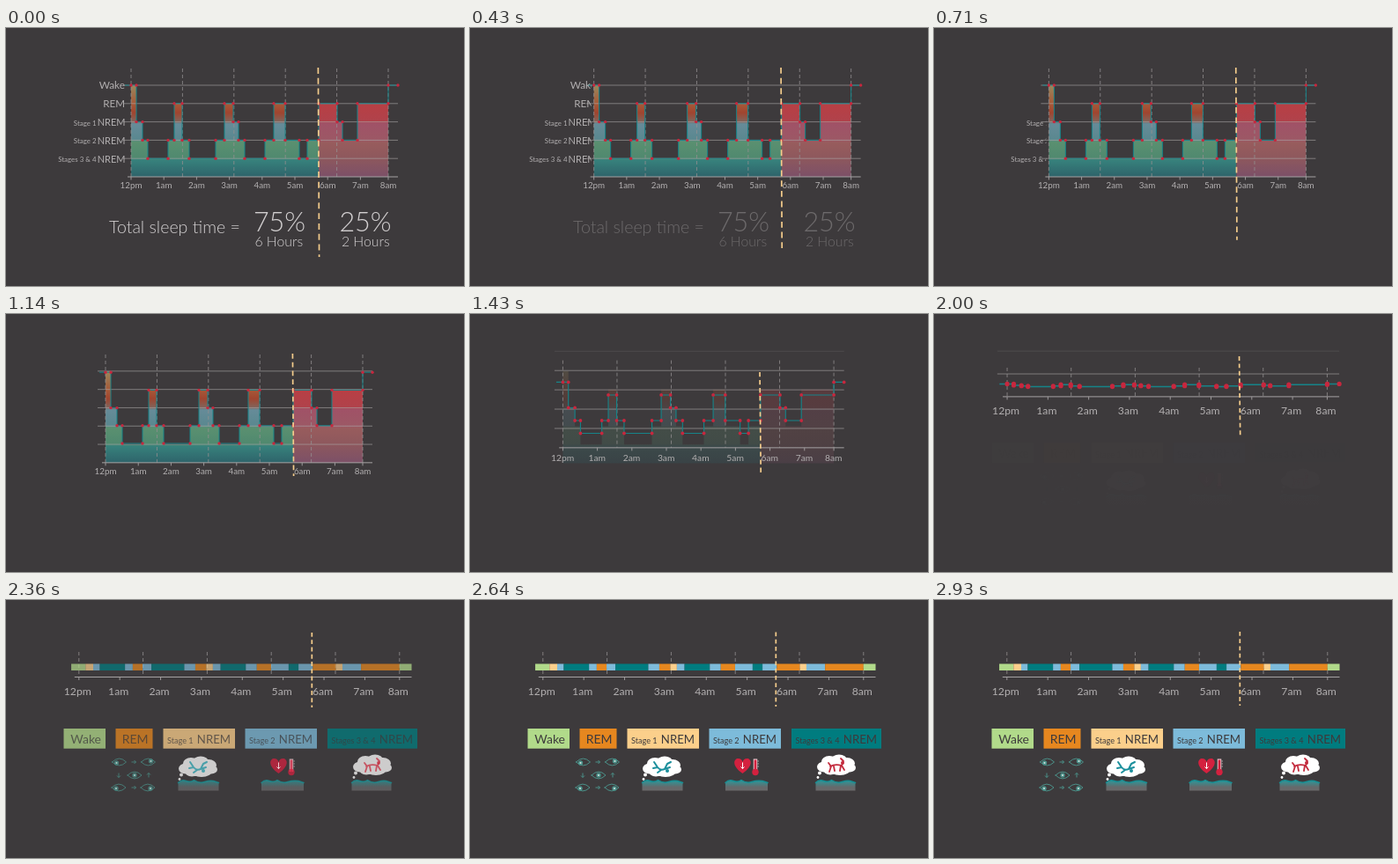
These frames come from a looping animation (520x293 px, 3 s). An HTML page with a canvas:

```html
<!DOCTYPE html>
<html lang="en">
<head>
<meta charset="utf-8">
<title>Sleep stages</title>
<style>
  html, body { margin: 0; width: 100%; height: 100%; overflow: hidden; background: #3d3a3c; }
  canvas { display: block; width: 520px; height: 293px; }
</style>
</head>
<body>
<canvas id="stage"></canvas>
<script>
const LOOP = 3000, W = 520, H = 293;
const canvas = document.getElementById('stage');
const ctx = canvas.getContext('2d');
const ratio = window.devicePixelRatio || 1;
canvas.width = W * ratio;
canvas.height = H * ratio;

const BG = '#3d3a3c', TEAL = '#168489', RED = '#c7273e', PALE = '#b2afb0', EYE = '#4b9189';
const STAGE_COLORS = ['#b1da8a', '#e6871f', '#fbcf8b', '#7dbbda', '#007c7f'];
const HOURS = ['12pm', '1am', '2am', '3am', '4am', '5am', '6am', '7am', '8am'];
const LEFT = 142, SPAN = 292, BASE = 169, ROW = 20.8, NOW = 355;

// [start x, depth]: 0 wake, 1 REM, 2 stage 1, 3 stage 2, 4 stages 3 & 4
const STEPS = [
  [135, 0], [148, 2], [155, 3], [161, 4], [184, 3], [191, 1], [200, 3], [208, 4],
  [238, 3], [248, 1], [258, 2], [264, 3], [271, 4], [294, 3], [304, 1], [317, 3],
  [333, 4], [342, 3], [355, 1], [376, 2], [382, 3], [399, 1], [434, 0]
];
const END = 445;
const stepEnd = i => i + 1 < STEPS.length ? STEPS[i + 1][0] : END;

const clamp = v => Math.max(0, Math.min(1, v));
const ramp = (t, a, b) => clamp((t - a) / (b - a));
const ease = (t, a, b) => { const p = ramp(t, a, b); return p * p * (3 - 2 * p); };
const mix = (a, b, p) => a + (b - a) * p;

function track(t, keys) {
  const i = keys.findIndex(k => k[0] > t);
  if (i < 0) return keys[keys.length - 1][1];
  const [t0, v0] = keys[i - 1], [t1, v1] = keys[i];
  return mix(v0, v1, (t - t0) / (t1 - t0));
}

function text(str, x, y, size, color, align = 'left', weight = 400) {
  ctx.font = `${weight} ${size}px Lato, "Open Sans", sans-serif`;
  ctx.textAlign = align;
  ctx.fillStyle = color;
  ctx.fillText(str, x, y);
}

function line(points, color, width = 1, dash = []) {
  ctx.beginPath();
  points.forEach(([x, y]) => ctx.lineTo(x, y));
  ctx.strokeStyle = color;
  ctx.lineWidth = width;
  ctx.setLineDash(dash);
  ctx.stroke();
  ctx.setLineDash([]);
}

function disc(x, y, r, color) {
  ctx.beginPath();
  ctx.arc(x, y, r, 0, 7);
  ctx.fillStyle = color;
  ctx.fill();
}

function shape(d, x, y, fill, stroke, width = 1) {
  ctx.save();
  ctx.translate(x, y);
  const path = new Path2D(d);
  if (fill) { ctx.fillStyle = fill; ctx.fill(path); }
  if (stroke) {
    ctx.strokeStyle = stroke;
    ctx.lineWidth = width;
    ctx.lineCap = ctx.lineJoin = 'round';
    ctx.stroke(path);
  }
  ctx.restore();
}

function faded(alpha, draw) {
  if (alpha <= 0) return;
  ctx.save();
  ctx.globalAlpha = alpha;
  draw();
  ctx.restore();
}

function gradient(y0, y1, stops) {
  const g = ctx.createLinearGradient(0, y0, 0, y1);
  stops.forEach(([at, color]) => g.addColorStop(at, color));
  return g;
}

function layout(t) {
  const zoom = ease(t, 1164, 2050);
  const slide = ease(t, 310, 1260);
  const scale = mix(1, 364 / SPAN, zoom);
  const left = LEFT - 30.3 * slide - 28.9 * zoom;
  return {
    zoom, scale, left,
    x: v => left + (v - LEFT) * scale,
    axis: mix(BASE, 87.5, ease(t, 1115, 2185)),
    levelY: d => mix(106.6, 76.3, ease(t, 1400, 2200)) + (d - 2) * mix(ROW, 0, ease(t, 1030, 2130)),
    dashTop: 46 + 15 * ease(t, 1200, 1700) - 2 * ease(t, 2000, 2360)
  };
}

function fillSteps(g, isIncluded, color) {
  const base = BASE + 2.5 * g.zoom;
  ctx.beginPath();
  STEPS.slice(0, -1).forEach(([x, depth], i) => {
    if (!isIncluded(x)) return;
    const from = g.x(Math.max(x, LEFT)), to = g.x(stepEnd(i)), top = 65 + depth * ROW;
    ctx.rect(from, top, to - from, base - top);
  });
  ctx.fillStyle = color;
  ctx.fill();
}

function drawFill(g) {
  const warm = gradient(65, BASE, [[0, '#99875c'], [.2, '#a65a39'], [.3, '#a0452f'], [.4, '#80655d'],
    [.42, '#668b98'], [.59, '#5a8890'], [.62, '#5a9070'], [.79, '#50896f'], [.82, '#37817c'], [1, '#2e636a']]);
  const pink = gradient(86, BASE, [[0, '#b83f44'], [.24, '#b0424b'], [.27, '#a05267'], [.5, '#9c5865'],
    [.53, '#985c5d'], [.74, '#8e585d'], [1, '#7c5068']]);
  fillSteps(g, x => x < NOW, warm);
  fillSteps(g, x => x >= NOW, pink);
}

function drawGrid(g, t) {
  const from = g.x(133), to = g.x(END);
  for (let k = 1; k <= 5; k++) {
    const gone = 1430 + (5 - k) * 190, y = g.axis - k * ROW * g.scale;
    faded(.68 * (1 - ease(t, gone - 120, gone + 60)), () => line([[from, y], [to, y]], '#aaa7a7', .9));
  }
  for (let i = 0; i < 6; i++) {
    const x = g.x(LEFT + i * SPAN / 5);
    line([[x, g.dashTop], [x, g.axis]], '#939091', .8, [4, 3]);
  }
  line([[g.x(138), g.axis], [to, g.axis]], '#a5a2a3', 1);
  HOURS.forEach((label, i) => {
    const x = g.x(LEFT + Math.min(i * 37.2, SPAN));
    line([[x, g.axis], [x, g.axis + 3.5]], '#a5a2a3', .9);
    text(label, x - 1.5 * g.zoom, g.axis + mix(13, 20.5, g.zoom), 9.8 * g.scale, PALE, 'center');
  });
}

function drawHypnogram(g) {
  const points = [];
  STEPS.forEach(([x, depth], i) => {
    const y = g.levelY(depth);
    points.push([g.x(x), y], [g.x(stepEnd(i)), y]);
  });
  line(points, TEAL, 1 + .5 * g.zoom);
  points[0][0] = g.left;
  points.forEach(([x, y]) => disc(x, y, mix(1.7, 2.6, g.zoom), RED));
}

function drawBar(g) {
  STEPS.forEach(([x, depth], i) => {
    ctx.fillStyle = STAGE_COLORS[depth];
    ctx.fillRect(g.x(x), 72.5, g.x(stepEnd(i)) - g.x(x), 7.5);
  });
}

function drawRowLabels(g, t) {
  if (t > 1100) return;
  const shift = 28 * ramp(t, 320, 710) + 60 * ramp(t, 710, 1100);
  ctx.save();
  ctx.beginPath();
  ctx.rect(0, 0, mix(136, g.left - 3, ramp(t, 300, 400)), H);
  ctx.clip();
  ctx.translate(shift, 0);
  text('Wake', 135, 69, 11.8, PALE, 'right');
  text('REM', 135, 90, 11.6, PALE, 'right');
  ['Stage 1', 'Stage 2', 'Stages 3 & 4'].forEach((name, i) => {
    const y = 111 + i * ROW;
    text('NREM', 135.5, y, 11, PALE, 'right');
    text(name, 102.5, y - .5, 7.9, PALE, 'right');
  });
  ctx.restore();
}

function drawTotals() {
  const bright = '#d2cfd0';
  text('Total sleep time =', 117, 233, 19.6, bright, 'left', 300);
  text('75%', 310.5, 230.5, 30.5, bright, 'center', 300);
  text('25%', 408, 230.5, 30.5, bright, 'center', 300);
  text('6 Hours', 309.8, 248.3, 15.8, bright, 'center', 300);
  text('2 Hours', 408.3, 248.3, 15.8, bright, 'center', 300);
}

function legendBox(color, x, width, name, small) {
  ctx.fillStyle = color;
  ctx.fillRect(x, 146, width, 22.7);
  if (small) text(small, x + 4.5, 163, 9.1, BG);
  text(name, x + width - 5, 163.3, small ? 13.2 : 14, BG, 'right');
}

function eye(x, y, dx, dy) {
  shape('M-8 0Q0-8 8 0Q0 8-8 0Z', x, y, null, EYE, 1);
  disc(x + dx, y + dy, 2.7, EYE);
  disc(x + dx, y + dy, 1, '#d9e5e2');
}

function arrow(x, y, turn, color, size = 2.5) {
  ctx.save();
  ctx.translate(x, y);
  ctx.rotate(turn * Math.PI / 2);
  line([[-size, 0], [size, 0]], color, 1);
  line([[size - 2, -2], [size, 0], [size - 2, 2]], color, 1);
  ctx.restore();
}

function bed(x, width) {
  const fill = gradient(0, 12, [[0, '#2f9a9c'], [.3, '#438486'], [.65, '#646a6c'], [1, '#6b6869']]);
  const surface = `M0 3Q4-1 9 1T18 0Q24 4 30 2T${width - 6} 1L${width} 3`;
  shape(`${surface}V12H0Z`, x, 204.5, fill);
  shape(surface, x, 204.5, null, '#178f94', 1.5);
}

function cloud(x, y) {
  ctx.beginPath();
  [[-14, 2, 8, 6], [-8, -4, 9, 6.5], [3, -6, 9, 6], [12, -2, 9, 6.5], [15, 3, 7, 5], [4, 5, 12, 6.5], [-7, 5, 8, 6]]
    .forEach(([dx, dy, rx, ry]) => {
      ctx.moveTo(x + dx + rx, y + dy);
      ctx.ellipse(x + dx, y + dy, rx, ry, 0, 0, Math.PI * 2);
    });
  ctx.fillStyle = '#fff';
  ctx.fill();
  disc(x - 19, y + 9, 2, '#fff');
  disc(x - 21, y + 14, 1.4, '#fff');
}

function drawLegend() {
  const [wake, rem, one, two, deep] = STAGE_COLORS;
  legendBox(wake, 65.5, 47.5, 'Wake');
  legendBox(rem, 124.5, 42, 'REM');
  legendBox(one, 178.5, 81.5, 'NREM', 'Stage 1');
  legendBox(two, 271.5, 81.5, 'NREM', 'Stage 2');
  legendBox(deep, 365, 102, 'NREM', 'Stages 3 & 4');

  eye(128.5, 184, -3, 1);
  eye(161.5, 184, 3, -1);
  eye(146, 199, 0, 0);
  eye(128, 213, -3, 1);
  eye(161, 213, 3, 1);
  arrow(145, 184, 0, EYE);
  arrow(145, 213, 0, EYE);
  arrow(128, 199, 1, EYE);
  arrow(162, 199, 3, EYE);

  bed(195.5, 46);
  cloud(218, 189.5);
  shape('M-9-5L-5 1Q-2 5 3 3L6-3L10-5M3 3L9 1M-5 1L-10 2M-1 4L-5 7', 218, 189, null, '#1b8f9c', 2);
  disc(224, 194, 2, '#1b8f9c');

  bed(290, 48);
  shape('M0 9C-13 0-10-8-5-8Q-1-8 0-4Q1-8 5-8C10-8 13 0 0 9Z', 309.5, 188, '#d4213f');
  arrow(309.5, 188, 1, '#fff', 3.5);
  line([[324, 180.5], [324, 195]], '#f1d9dc', 4.5);
  disc(324, 195.5, 3.7, '#d4213f');
  line([[324, 181.5], [324, 195]], '#d4213f', 2.8);
  [183, 186, 189].forEach(y => line([[326.5, y], [328, y]], '#ddd', .7));

  bed(392.5, 45);
  cloud(416, 187.5);
  shape('M-7 1Q-2-2 6 0M-6 1L-8 7M-3 1L-2 6M5 0L4 6M6 0L9 5M6 0L8-5L5-8M-6 1L-9-3', 416, 188, null, '#c32a3d', 1.8);
  disc(423, 185, 2, '#c32a3d');
}

function drawDivider(g, t) {
  const top = track(t, [[0, 45], [1140, 45], [1430, 66], [2000, 48], [2360, 37], [2930, 36]]);
  const bottom = track(t, [[0, 260], [350, 259], [710, 241], [1140, 184], [1430, 180], [2000, 139], [2360, 122], [2930, 120]]);
  const x = g.x(NOW) - g.zoom;
  const tilt = .6 * (1 - ramp(t, 2000, 2360));
  const dash = 3.5 + .016 * (bottom - top);
  line([[x - tilt, top], [x + tilt, bottom]], '#f5cd8c', 1.7, [dash, .7 * dash]);
}

function render(t) {
  const g = layout(t);
  ctx.setTransform(ratio, 0, 0, ratio, 0, 0);
  ctx.fillStyle = BG;
  ctx.fillRect(0, 0, W, H);

  faded(1 - .78 * ramp(t, 1160, 1420) - .22 * ramp(t, 1450, 1700), () => drawFill(g));
  drawGrid(g, t);
  faded(1 - ramp(t, 2030, 2300), () => drawHypnogram(g));
  drawRowLabels(g, t);
  faded(1 - ramp(t, 70, 600), drawTotals);
  faded(ramp(t, 2030, 2490), () => drawBar(g));
  faded(ramp(t, 1995, 2490), drawLegend);
  drawDivider(g, t);
}

function frame() {
  render(performance.now() % LOOP);
  requestAnimationFrame(frame);
}
frame();
</script>
</body>
</html>
```
